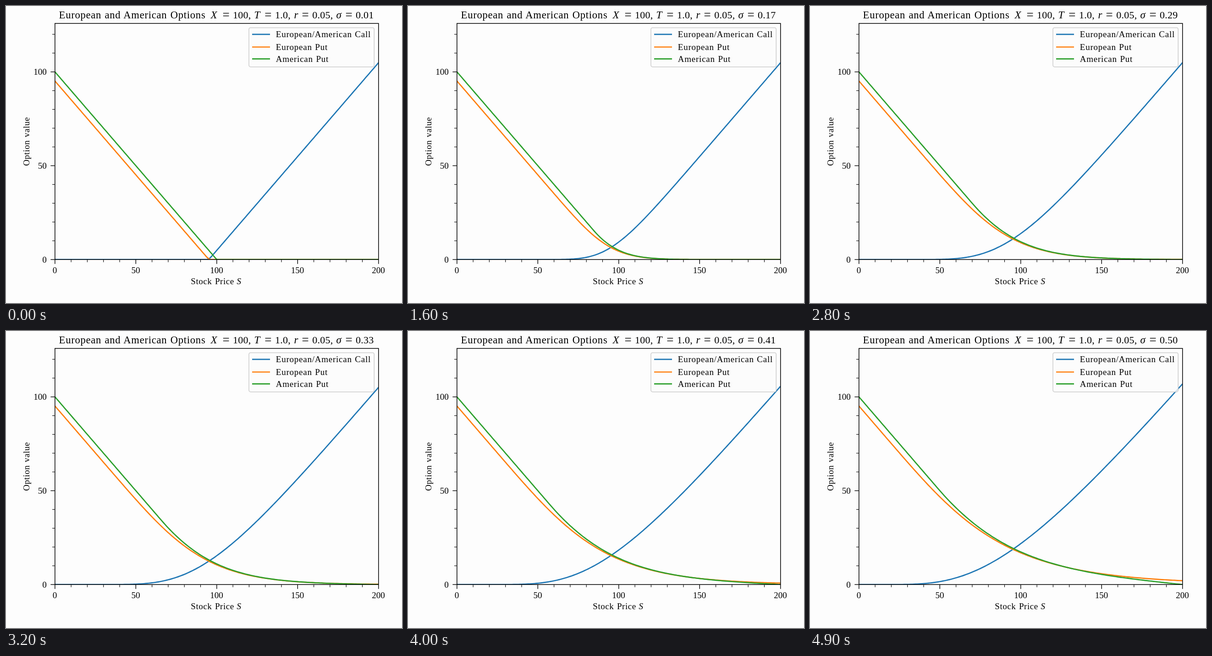
Recreate the animation shown at these times as an HTML page. Size 864 by 648 pixels, loop 5000 ms.

```html
<!DOCTYPE html>
<html lang="en">
<head>
<meta charset="utf-8">
<title>Option values against volatility</title>
<style>
  html, body { margin: 0; width: 100%; height: 100%; overflow: hidden; background: #fdfdfd; }
  svg { display: block; width: 864px; height: 648px; }
  text { font: 19px "Liberation Serif", "Times New Roman", serif; white-space: pre; }
  .label { letter-spacing: .03em; word-spacing: .06em; }
  .legend text { letter-spacing: .04em; word-spacing: .06em; }
  .title text { font-size: 22px; letter-spacing: .01em; }
  .title .words { font-size: 22.5px; letter-spacing: .035em; word-spacing: .04em; }
  .title .eq { font-size: 27px; letter-spacing: 0; }
  text.var, .title .var { font-style: italic; letter-spacing: 0; }
  .title .var { font-size: 23px; }
  .curve { fill: none; stroke-width: 2.7; stroke-linejoin: round; }
  .major { stroke: #000; stroke-width: 1.4; }
  .minor { stroke: #000; stroke-width: 1.1; }
</style>
</head>
<body>
<svg viewBox="0 0 864 648">
  <clipPath id="area"><rect x="106.8" y="38" width="706" height="515.2"/></clipPath>
  <rect width="864" height="648" fill="#fdfdfd"/>
  <g clip-path="url(#area)">
    <path id="call" class="curve" stroke="#1f77b4"/>
    <path id="euro" class="curve" stroke="#ff7f0e"/>
    <path id="amer" class="curve" stroke="#2ca02c"/>
  </g>
  <g id="ticks"></g>
  <rect x="106.8" y="38" width="706" height="515.2" fill="none" stroke="#000" stroke-width="1.5"/>
  <g class="legend">
    <rect x="530" y="47.3" width="273.3" height="85.5" rx="3.7" fill="#fdfdfd" fill-opacity=".8" stroke="#ccc" stroke-opacity=".85" stroke-width="1.8"/>
    <path class="curve" stroke="#1f77b4" d="M537 61.9h39"/>
    <path class="curve" stroke="#ff7f0e" d="M537 89.5h39"/>
    <path class="curve" stroke="#2ca02c" d="M537 115.3h39"/>
    <text x="588.8" y="68.3">European/American Call</text>
    <text x="588.8" y="96">European Put</text>
    <text x="588.8" y="121.7">American Put</text>
  </g>
  <g class="title" id="title">
    <text class="words" x="115.6" y="27">European and American Options</text>
  </g>
  <text class="label" x="403.3" y="607.3">Stock Price</text>
  <text class="var" x="503.5" y="607.3">S</text>
  <text class="label" transform="translate(50.5 348.8) rotate(-90)">Option value</text>
</svg>
<script>
  const K = 100, T = 1, R = 0.05, MAX = 200, FRAMES = 50, STEP = 100;
  const px = s => 106.8 + s * 3.53;
  const py = v => 553.2 - v * 4.095;
  const $ = id => document.getElementById(id);

  function add(parent, tag, attrs, content = "") {
    const el = document.createElementNS("http://www.w3.org/2000/svg", tag);
    for (const k in attrs) el.setAttribute(k, attrs[k]);
    el.textContent = content;
    parent.appendChild(el);
    return el;
  }

  // Axis ticks and numbers
  for (let v = 0; v <= MAX; v += 10) {
    const major = v % 50 === 0, kind = major ? "major" : "minor", len = major ? 9.5 : 5.8;
    add($("ticks"), "path", { class: kind, d: `M${px(v)} 553.2v${len}` });
    if (major) add($("ticks"), "text", { x: px(v) - 0.4, y: 583, "text-anchor": "middle" }, v);
    if (v > 120) continue;
    add($("ticks"), "path", { class: kind, d: `M106.8 ${py(v)}h${-len}` });
    if (major) add($("ticks"), "text", { x: 88.8, y: py(v) + 6.3, "text-anchor": "end" }, v);
  }

  // Title: symbol, equals sign and value of each parameter
  function param(name, x, eqX, valX, value) {
    add($("title"), "text", { class: "var", x, y: 27 }, name);
    add($("title"), "text", { class: "eq", x: eqX + 0.4, y: 28.3 }, "=");
    return add($("title"), "text", { x: valX, y: 27 }, value);
  }
  param("X", 446.5, 472, 495, "100,");
  param("T", 541.6, 563.8, 587, "1.0,");
  param("r", 628.5, 645.1, 668.3, "0.05,");
  const sigmaText = param("σ", 720.5, 740, 763, "");

  // Standard normal distribution function
  function cdf(x) {
    const z = Math.abs(x) / Math.SQRT2, t = 1 / (1 + 0.3275911 * z);
    const p = t * (0.254829592 + t * (-0.284496736 + t * (1.421413741 + t * (-1.453152027 + t * 1.061405429))));
    const tail = p * Math.exp(-z * z) / 2;
    return x > 0 ? 1 - tail : tail;
  }

  function callValue(s, sigma) {
    const sd = sigma * Math.sqrt(T);
    const d1 = (Math.log(s / K) + (R + sigma * sigma / 2) * T) / sd;
    return s * cdf(d1) - K * Math.exp(-R * T) * cdf(d1 - sd);
  }

  // American put: implicit differences with early exercise, zero at the upper edge
  function americanPut(sigma) {
    const per = 4, n = MAX * per, steps = 200, dt = T / steps;
    const pay = Float64Array.from({ length: n + 1 }, (_, i) => Math.max(K - i / per, 0));
    const v = pay.slice();
    const [a, b, c, d] = [0, 1, 2, 3].map(() => new Float64Array(n + 1));
    b[n] = 1;
    for (let i = n - 1; i > 0; i--) {
      const diff = dt * sigma * sigma * i * i / 2, drift = dt * R * i / 2;
      const upwind = diff < drift;
      a[i] = upwind ? diff : diff - drift;
      c[i] = upwind ? diff + 2 * drift : diff + drift;
      b[i] = 1 + a[i] + c[i] + R * dt - c[i] * a[i + 1] / b[i + 1];
    }
    for (let k = 0; k < steps; k++) {
      for (let i = n - 1; i > 0; i--) d[i] = v[i] + c[i] * d[i + 1] / b[i + 1];
      for (let i = 1; i < n; i++) v[i] = Math.max(pay[i], (d[i] + a[i] * v[i - 1]) / b[i]);
    }
    return s => v[s * per];
  }

  function trace(f) {
    let path = "";
    for (let s = 0; s <= MAX; s++) path += (s ? "L" : "M") + px(s).toFixed(2) + " " + py(f(s)).toFixed(2);
    return path;
  }

  const cache = [];
  function curves(k) {
    if (!cache[k]) {
      const sigma = (k + 1) / 100;
      const call = s => callValue(s, sigma);
      cache[k] = {
        call: trace(call),
        euro: trace(s => call(s) - s + K * Math.exp(-R * T)),
        amer: trace(americanPut(sigma))
      };
    }
    return cache[k];
  }

  let shown = -1;
  function draw(now) {
    const k = Math.floor(Math.max(now, 0) / STEP) % FRAMES;
    if (k !== shown) {
      shown = k;
      const paths = curves(k);
      for (const id in paths) $(id).setAttribute("d", paths[id]);
      sigmaText.textContent = ((k + 1) / 100).toFixed(2);
    }
  }

  const start = performance.now();
  function loop() {
    draw(performance.now() - start);
    requestAnimationFrame(loop);
  }
  loop();
</script>
</body>
</html>
```
